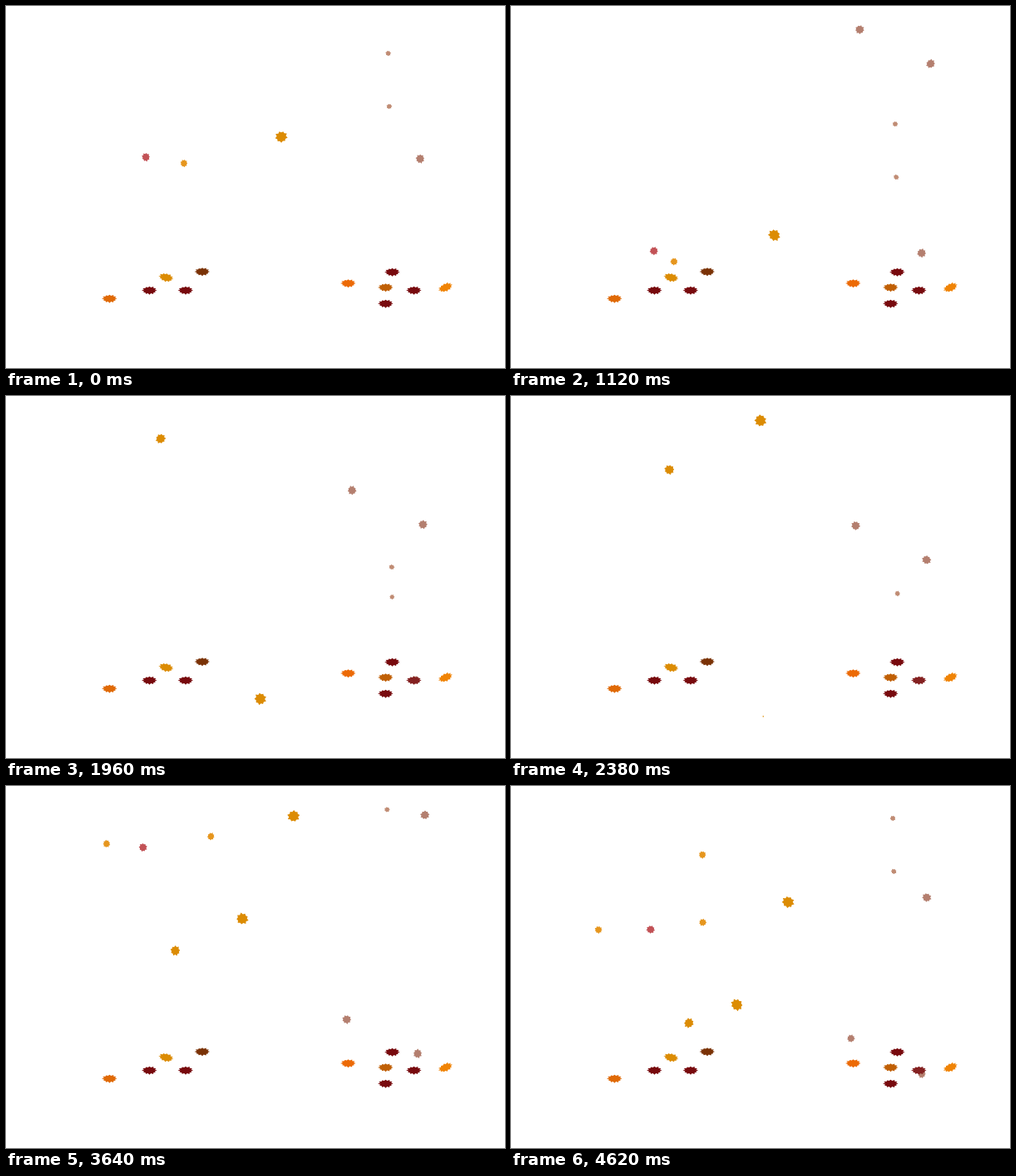
These frames come from a looping animation (600x436 px, 4.76 s). An HTML page with a canvas:

```html
<!DOCTYPE html>
<html lang="en">
<head>
<meta charset="utf-8">
<title>Falling leaves</title>
<style>
  html, body { margin: 0; width: 100%; height: 100%; overflow: hidden; background: #fff; }
  canvas { display: block; }
</style>
</head>
<body>
<canvas id="stage" width="600" height="436"></canvas>
<script>
const ctx = document.getElementById('stage').getContext('2d');
const STEP = 140, STEPS = 34;
const GOLD = '#dc8c04', WINE = '#780a0e';

// Every kind falls at its own velocity (px per step) and comes again after a period.
// A drop enters the top edge at a given step and x, and lands on its floor.
const kinds = [
  { color: GOLD, r: 7.8, vx: -1.8, vy: 14.8, period: 34, rest: 1.62, drops: [
    { start: -10.65, x: 350.2, floor: 386 }, { start: 15, x: 303.6, floor: 386 }] },
  { color: GOLD, r: 6.5, vx: 1.49, vy: 12.45, period: 34, rest: 2, drops: [
    { start: 9.87, x: 179.8, floor: 386 }] },
  { color: '#c25256', r: 5.5, vx: 0.45, vy: 14.12, period: 33.45, rest: 0.6, drops: [
    { start: -12.89, x: 162.4, floor: 341 }] },
  { color: '#e6961e', r: 4.9, vx: -2.25, vy: 14.8, period: 40, rest: 2, drops: [
    { start: -12.8, x: 242.8, floor: 326 }, { start: 21.1, x: 131.5, floor: 352 },
    { start: 21.7, x: 255.6, floor: 326 }] },
  { color: '#b47f6f', r: 5.9, vx: -0.54, vy: 14.2, period: 36.3, rest: 9, drops: [
    { start: -12.96, x: 505, floor: 342 }, { start: 3.1, x: 507.2, floor: 347 },
    { start: 6, x: 420.4, floor: 304 }] },
  { color: '#c08c74', r: 3.6, vx: 0.3, vy: 10.64, period: 34.5, rest: 5, drops: [
    { start: -11.37, x: 457.4, floor: 242 }, { start: -5.36, x: 458, floor: 242 }] }
];

const ground = [
  { x: 124.5, y: 352.5, color: '#e06a06' },
  { x: 172.5, y: 342.5, color: WINE },
  { x: 216, y: 342.5, color: WINE },
  { x: 192.5, y: 327, color: GOLD, tilt: 0.22 },
  { x: 236, y: 320, color: '#7a3206' },
  { x: 411.5, y: 334, color: '#ec6a06' },
  { x: 456.5, y: 339, color: '#c06006' },
  { x: 464.5, y: 320.5, color: WINE },
  { x: 490.5, y: 342.5, color: WINE },
  { x: 456.5, y: 358.5, color: WINE },
  { x: 528.5, y: 339, color: '#f08406', tilt: -0.42 }
];

// The fall slows for a moment after step 17.
function pace(n) {
  if (n <= 17) return n;
  return n <= 21 ? 17 + 0.88 * (n - 17) : n - 0.2;
}

function drawLeaf(x, y, rx, ry, points, turn, tilt, color) {
  ctx.save();
  ctx.translate(x, y);
  ctx.rotate(tilt);
  ctx.beginPath();
  for (let i = 0; i < points * 2; i++) {
    const a = turn + i * Math.PI / points;
    const k = i % 2 ? 0.72 : 0.96 + 0.07 * Math.sin(i * 2.3);
    ctx.lineTo(Math.cos(a) * rx * k, Math.sin(a) * ry * k);
  }
  ctx.closePath();
  ctx.fillStyle = color;
  ctx.fill();
  ctx.restore();
}

// Where a drop is at a given moment, or null once it has withered.
function place(kind, drop, start, u) {
  const fall = drop.floor / kind.vy;
  const age = u - start;
  const t = Math.min(age, fall);
  const withered = Math.max(0, age - fall) / kind.rest;
  if (age < -1 || withered >= 1) return null;
  return {
    x: drop.x + kind.vx * t,
    y: kind.vy * t,
    r: kind.r * (1 - withered ** 4),
    turn: start + t * 0.31,
    color: kind.color
  };
}

function airborne(u) {
  const leaves = [];
  for (const kind of kinds)
    for (const drop of kind.drops)
      for (const start of [drop.start, drop.start + kind.period])
        leaves.push(place(kind, drop, start, u));
  return leaves.filter(Boolean);
}

function drawGround(g, leaves) {
  const draw = color => drawLeaf(g.x, g.y, 9.4, 5.2, 12, 0, g.tilt || 0, color);
  draw(g.color);
  // A leaf lying close by shines through.
  const near = leaves.find(l => Math.hypot(l.x - g.x, l.y - g.y) < 6);
  if (!near) return;
  ctx.globalAlpha = 0.2;
  draw(near.color);
  ctx.globalAlpha = 1;
}

function tick(now) {
  start ??= now;
  const n = Math.floor(Math.max(0, now - start) / STEP) % STEPS;
  const leaves = airborne(pace(n));
  ctx.clearRect(0, 0, 600, 436);
  for (const l of leaves)
    drawLeaf(l.x, l.y, l.r, l.r * 0.95, l.r < 4 ? 7 : 9, l.turn, l.turn * 0.5, l.color);
  for (const g of ground) drawGround(g, leaves);
  requestAnimationFrame(tick);
}

let start;
requestAnimationFrame(tick);
</script>
</body>
</html>
```
